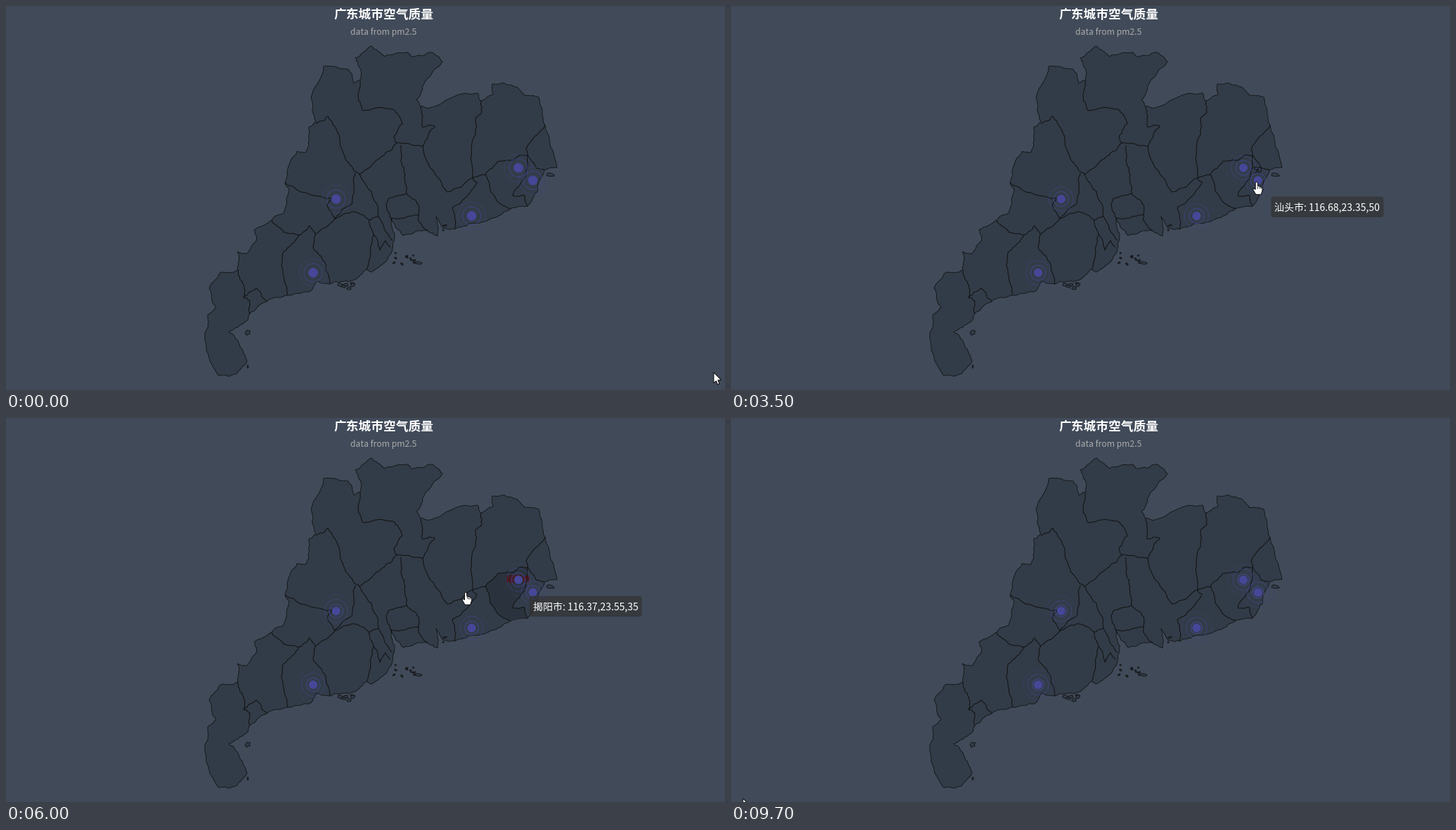
These frames come from a looping animation (1023 by 547 pixels, 9.8 s). A matplotlib script:

```python
import numpy as np
import matplotlib.pyplot as plt
from matplotlib.animation import FuncAnimation
from matplotlib.collections import LineCollection, PolyCollection
from matplotlib.patches import Circle, FancyBboxPatch, Polygon

W, H, DPI = 1023, 547, 100
PX = 72 / DPI
STEP, FRAMES = 100, 98
RIPPLE, R0, R1 = 4000, 6, 26
LAND, LAND_HOVER, EDGE, DOT = "#323c48", "#2a333d", "#111111", "#464799"

plt.rcParams["font.family"] = ["Noto Sans CJK JP"]
rng = np.random.default_rng(5)

fig = plt.figure(figsize=(W / DPI, H / DPI), dpi=DPI, facecolor="#404a59")
ax = fig.add_axes([0, 0, 1, 1])
ax.set(xlim=(0, W), ylim=(H, 0))
ax.axis("off")


def rough(*flat):
    """Join a few key points by a fractal, coast-like line."""
    pts = np.array(flat, float).reshape(-1, 2)
    for _ in range(3):
        d = np.diff(pts, axis=0)
        size = np.hypot(d[:, 0], d[:, 1])
        push = rng.uniform(-1, 1, size.size) * (0.5 + 0.07 * size) / size
        mid = pts[:-1] + d / 2 + np.column_stack([-d[:, 1], d[:, 0]]) * push[:, None]
        pts = np.insert(pts, np.arange(1, len(pts)), mid, axis=0)
    return pts


def blob(x, y, rx, ry):
    a = np.arange(10) * np.pi / 5
    k = rng.uniform(0.6, 1.15, a.size)
    return np.column_stack([x + rx * k * np.cos(a), y + ry * k * np.sin(a)])


# outer edge, clockwise
west = rough(401, 412, 371, 421, 347, 438, 342, 449, 317, 464, 331, 480, 343, 505,
             328, 524, 302, 526, 283, 466, 287, 440, 299, 430, 289, 402, 305, 380,
             330, 376, 329, 350, 342, 353, 357, 332, 353, 319, 378, 305, 395, 295,
             403, 262, 397, 252, 400, 235, 414, 207, 427, 208, 431, 172)
north = rough(431, 172, 441, 165, 434, 130, 452, 86, 487, 90, 495, 110, 504, 106,
              505, 92, 497, 74, 520, 57, 538, 72, 570, 66, 577, 72, 606, 66, 621, 79,
              599, 104, 584, 133, 590, 143, 600, 146, 671, 124, 676, 135, 693, 126,
              692, 111, 720, 113, 738, 128, 758, 130, 767, 170, 784, 230, 766, 234)
shantou_s = rough(766, 234, 757, 262, 742, 285)
jieyang_s = rough(742, 285, 718, 289)
south = rough(718, 289, 690, 303, 660, 310, 638, 318, 622, 317, 612, 300, 614, 328,
              600, 320, 565, 327, 548, 302, 553, 324, 543, 360, 520, 379, 513, 375,
              498, 389, 482, 392, 461, 396)
yangjiang_s = rough(461, 396, 442, 392, 432, 407, 401, 412)
province = np.vstack([west, north, shantou_s, jieyang_s, south, yangjiang_s])

# borders around the three hover areas
jieyang_n = rough(682, 240, 700, 221, 722, 220, 732, 212, 742, 213)
jieyang_e = rough(742, 213, 742, 230, 721, 270, 738, 270, 742, 285)
jieyang_w = rough(682, 240, 690, 265, 708, 285, 718, 289)
shantou_n = rough(742, 213, 754, 230, 766, 234)
yangjiang_n = rough(417, 326, 432, 313, 440, 325)
yangjiang_e = rough(440, 325, 437, 345, 455, 368, 461, 396)
yangjiang_w = rough(417, 326, 395, 350, 392, 370, 401, 412)
areas = {
    "汕头市": np.vstack([jieyang_e[::-1], shantou_n, shantou_s]),
    "揭阳市": np.vstack([jieyang_n, jieyang_e, jieyang_s, jieyang_w[::-1]]),
    "阳江市": np.vstack([yangjiang_n, yangjiang_e, yangjiang_s, yangjiang_w[::-1]]),
}

borders = [
    jieyang_n, jieyang_e, jieyang_w, shantou_n, yangjiang_n, yangjiang_e, yangjiang_w,
    rough(504, 106, 501, 135, 508, 149, 550, 147, 564, 168, 552, 187, 556, 195),
    rough(590, 143, 592, 172, 610, 171, 601, 182, 593, 200, 556, 195),
    rough(556, 195, 535, 214, 503, 240, 520, 264, 530, 300),
    rough(441, 168, 458, 157, 475, 190, 486, 222, 503, 240),
    rough(397, 252, 445, 271, 463, 274, 457, 285, 468, 303),
    rough(497, 238, 495, 262, 493, 280, 468, 303, 495, 293, 517, 305),
    rough(562, 198, 562, 222, 568, 240, 570, 267, 587, 283, 587, 306, 600, 320),
    rough(570, 267, 545, 274, 541, 283, 548, 302, 587, 298),
    rough(593, 200, 615, 245, 628, 265, 664, 245),
    rough(676, 135, 677, 152, 668, 160, 662, 205, 664, 245),
    rough(682, 240, 664, 245, 670, 252, 635, 287, 638, 318),
    rough(742, 213, 740, 204, 767, 170),
    rough(378, 305, 395, 322, 417, 326),
    rough(440, 325, 468, 303),
    rough(330, 376, 339, 402, 338, 415, 356, 402, 371, 421),
    rough(338, 415, 347, 420, 347, 438),
    rough(517, 305, 523, 325, 518, 345, 513, 375),
    rough(517, 305, 530, 300, 550, 334),
    rough(523, 325, 532, 348, 540, 334, 547, 343),
]

islands = [blob(774, 240, 7, 3), blob(344, 465, 4, 4), blob(344, 514, 1.2, 2.5),
           blob(586, 366, 6, 2)]
for x, y, dx, dy, size, count in ((485, 398, 12, 5, 3.5, 6), (566, 365, 16, 14, 1.4, 16),
                                  (622, 316, 6, 4, 1.5, 3)):
    islands += [blob(x + rng.uniform(-dx, dx), y + rng.uniform(-dy, dy),
                     size, 0.7 * size) for _ in range(count)]

land = dict(fc=LAND, ec=EDGE, lw=0.8 * PX, zorder=1)
ax.add_patch(Polygon(province, **land))
ax.add_collection(PolyCollection(islands, **land))
ax.add_collection(LineCollection(borders, colors=EDGE, lw=PX, zorder=3))


def label(x, y, text, size, color, **kw):
    return ax.text(x, y, text, fontsize=size * PX, color=color, **kw)


label(537.5, 18.5, "广东城市空气质量", 17.7, "white", ha="center", weight="bold")
label(537.5, 41, "data from pm2.5", 12.2, "#aaaaaa", ha="center")

# markers with three ripples each
spots = {"揭阳市": (729, 230.5), "汕头市": (749.7, 248.5), "阳江市": (437, 380),
         "肇庆市": (469.7, 275), "汕尾市": (662.5, 299)}
rings = []
for spot in spots.values():
    ax.add_patch(Circle(spot, R0, fc=DOT, lw=0, zorder=6))
    for i in range(3):
        ring = Circle(spot, R0, fill=False, ec=DOT, lw=PX, zorder=5)
        rings.append((ax.add_patch(ring), i / 3))

# name, position, value, time over the marker, time over the area
stops = (("汕头市", "116.68,23.35", 50, (3200, 4400), (2200, 3000)),
         ("揭阳市", "116.37,23.55", 35, (4500, 5500), (5600, 6000)),
         ("阳江市", "111.98,21.87", 44, (7300, 8000), (8100, 8100)))
hovers, tips = [], []
for name, place, value, over, inside in stops:
    x, y = spots[name]
    shape = ax.add_patch(Polygon(areas[name], fc=LAND_HOVER, lw=0, zorder=2))
    title = label(x, y, name, 12, "#640000", ha="center", va="center", zorder=4)
    number = label(x, y - 11, str(value), 12, EDGE, ha="center", zorder=7)
    hovers += [(inside, shape), (inside, title), (over, number)]
    tips.append((over[0], max(over[1], inside[1]), x + 15.7, y + 23,
                 f"{name}: {place},{value}"))

tip_box = ax.add_patch(FancyBboxPatch((0, 0), 160, 29.5, fc="#323232b3", lw=0, zorder=8,
                                      boxstyle="round,pad=0,rounding_size=4"))
tip_text = label(0, 0, "", 14, "white", zorder=9)

# pointer: time, x, y
path = np.array([(1000, 1007, 522), (1600, 823, 385), (2500, 737, 233),
                 (3100, 749, 250), (4300, 745, 251), (4400, 731, 228),
                 (5500, 725, 235), (5800, 718, 238), (6000, 654, 248),
                 (7000, 416, 382), (7300, 432, 382), (8000, 432, 382),
                 (8100, 388, 354), (9000, 17, 542)])
ARROW = np.array([(0, 0), (0, 15), (3.4, 12), (5.7, 17.2), (8, 16.2), (5.8, 11),
                  (10.4, 10.7)])
HAND = np.array([(-1.5, 1), (0, 0), (1.5, 1), (1.8, 6), (6, 7), (8.6, 9), (8.2, 13),
                 (6.6, 18), (-1, 18), (-5, 11), (-4, 9.5), (-1.5, 11)])
pointer = ax.add_patch(Polygon(ARROW, fc="white", ec="black", lw=0.9 * PX,
                               joinstyle="round", zorder=11))
creases = ax.add_collection(LineCollection([], colors="black", lw=0.8 * PX, zorder=12))


def draw(n):
    t = n * STEP
    for ring, offset in rings:
        u = (t / RIPPLE + 0.02 + offset) % 1
        ring.set_radius(R0 + (R1 - R0) * u)
        ring.set_alpha(1 - u)

    for (start, end), part in hovers:
        part.set_visible(start <= t <= end)

    tip_box.set_visible(False)
    tip_text.set_visible(False)
    for start, end, x, y, text in tips:
        if start <= t <= end:
            x += 4 * (end - t) / (end - start)
            tip_box.set_bounds(x, y, 160, 29.5)
            tip_text.set(text=text, position=(x + 5, y + 20))
            tip_box.set_visible(True)
            tip_text.set_visible(True)

    x, y = (np.interp(t, path[:, 0], path[:, k]) for k in (1, 2))
    hand = 2200 <= t <= 8200
    pointer.set_xy((HAND if hand else ARROW) + (x, y))
    creases.set_segments([[(x + d, y + 6 + d / 4), (x + d, y + 9 + d / 8)]
                          for d in (1.8, 4, 6.2) if hand])
    return []


anim = FuncAnimation(fig, draw, frames=FRAMES, interval=STEP, repeat=True,
                     repeat_delay=0, blit=False)
plt.show()
```
